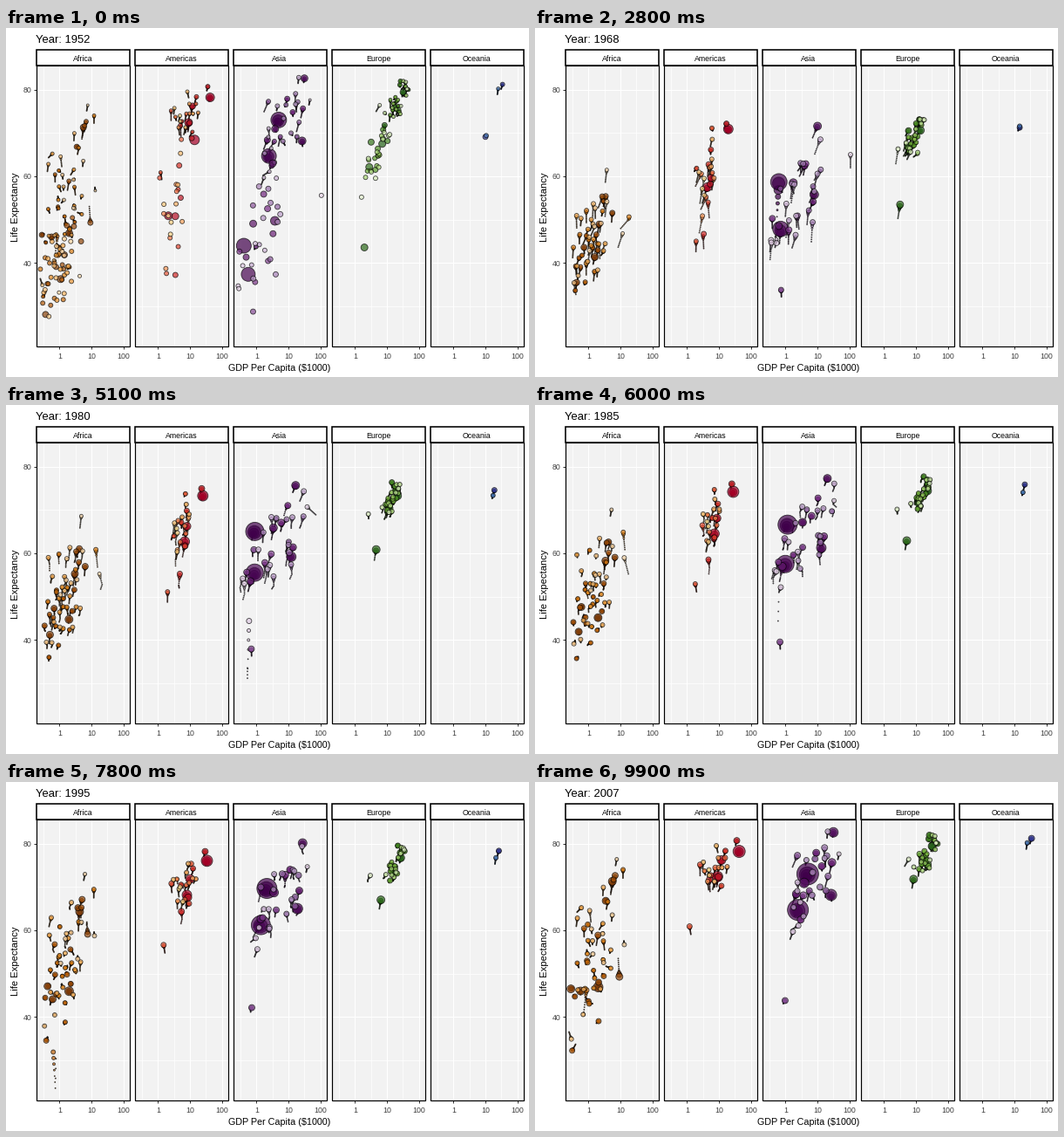
Recreate the animation shown at these times as a matplotlib script. Size 600 px wide and 400 px high, loop 10000 ms.

```python
import numpy as np
import matplotlib.pyplot as plt
from matplotlib.animation import FuncAnimation
from matplotlib.colors import LinearSegmentedColormap
from matplotlib.patches import Rectangle

W, H, FRAMES, WAKE = 600, 400, 100, 10
PX = 0.72  # points per pixel at 100 dpi
LEFT, PITCH, PANEL_W = 34.5, 113, 107
STRIP, TOP, BOTTOM = 24.5, 43, 365
YEARS = np.linspace(1952, 2007, FRAMES)
CENSUS = np.arange(1952, 2008, 5)
ERAS = (1952, 1980, 2007)

plt.rcParams["font.family"] = ["Liberation Sans", "DejaVu Sans"]


def x_pos(log_gdp, panel):
    return LEFT + PITCH * panel + 26.9 + 36.6 * log_gdp


def y_pos(life):
    return 269.4 - 4.97 * (life - 40)


def radius(pop):
    return 1.067 * (2 + 10 * np.sqrt(pop / 1319))


def lead_track(points):
    """Wealth and life through (year, gdp, life) points."""
    year, gdp, life = np.array(points).T
    return (np.interp(YEARS, year, np.log10(gdp)),
            np.interp(YEARS, year, life))


def crowd_tracks(rng, n, wealth, life, link):
    """Random tracks that follow a (mean, spread) pair in each era."""
    def deal():
        return rng.permutation(np.linspace(-1.7, 1.7, n))

    rich = deal()
    fit = link * rich + np.sqrt(1 - link ** 2) * deal()

    def walk(base, eras, jitter):
        keys = [m + s * (0.92 * base + 0.39 * deal()) for m, s in eras]
        noise = rng.normal(0, jitter, (n, len(CENSUS)))
        return [np.interp(YEARS, CENSUS, np.interp(CENSUS, ERAS, k) + e)
                for k, e in zip(np.transpose(keys), noise)]

    return list(zip(walk(rich, wealth, 0.035), walk(fit, life, 0.4)))


xs, ys, rs, fills = [], [], [], []


def add(panel, ramp, share, leads, n=0, top=0, **trend):
    """Leads have fixed paths; n more countries are drawn at random."""
    tracks = [lead_track(points) for _, points in leads]
    pop = [p for p, _ in leads]
    if n:
        tracks += crowd_tracks(np.random.default_rng(panel + 7), n, **trend)
        pop += list(top * np.arange(1, n + 1) ** -0.85)
    order = np.argsort(pop)[::-1]
    tracks = np.array(tracks)[order]
    growth = share ** ((2007 - YEARS) / 55)
    xs.append(x_pos(tracks[:, 0].T, panel))
    ys.append(y_pos(tracks[:, 1].T))
    rs.append(radius(np.outer(growth, np.array(pop)[order])))
    cmap = LinearSegmentedColormap.from_list("ramp", ramp)
    fills.append(cmap(np.linspace(0, 1, len(pop))))


add(0, ["#7F3B08", "#B35806", "#E08214", "#FDB863", "#FEE0B6"], .27, [
    (135, [(1952, 1.08, 36.3), (1977, 1.98, 44.5), (2007, 2.01, 46.9)]),
    (80, [(1952, 1.42, 41.9), (1977, 2.79, 53.3), (2007, 5.58, 71.3)]),
    (65, [(1952, .78, 39.1), (1982, .67, 47.8), (2007, .28, 46.5)]),
    (44, [(1952, 4.73, 45), (1992, 7.2, 61.9), (2007, 9.27, 49.3)]),
    (8.9, [(1952, .49, 40), (1987, .85, 44), (1992, .74, 23.6),
           (1997, .59, 36.1), (2007, .86, 46.2)]),
    (6, [(1952, 2.39, 42.7), (1967, 18.8, 50.2), (1987, 11.8, 66.2),
         (2007, 12.1, 74)]),
    (1.5, [(1952, 4.29, 37), (1977, 21.7, 52.8), (1987, 11.9, 60.2),
           (2007, 13.2, 56.7)]),
    (.8, [(1952, 2.72, 52.7), (1980, 4.8, 68.5), (2007, 7.67, 76.4)]),
], n=44, top=75, link=.45,
    wealth=[(-.05, .27), (.13, .31), (.15, .36)],
    life=[(38.7, 5), (50, 6), (54, 8.5)])

add(1, ["#A50026", "#D73027", "#F46D43", "#FDAE61", "#FEE090"], .42, [
    (301, [(1952, 14, 68.4), (1967, 19.5, 70.8), (2007, 43, 78.2)]),
    (190, [(1952, 2.11, 50.9), (1977, 6.66, 61.5), (2007, 9.07, 72.4)]),
    (109, [(1952, 3.48, 50.8), (1977, 7.67, 65), (2007, 12, 76.2)]),
    (33, [(1952, 11.4, 68.8), (1977, 22.1, 74.2), (2007, 36.3, 80.7)]),
    (8.5, [(1952, 1.84, 37.6), (1980, 2, 51), (2007, 1.2, 60.9)]),
], n=20, top=44, link=.6,
    wealth=[(.49, .2), (.74, .18), (.88, .23)],
    life=[(53, 8.5), (65.5, 5), (74, 3)])

add(2, ["#40004B", "#762A83", "#9970AB", "#C2A5CF", "#E7D4E8"], .4, [
    (1319, [(1952, .4, 44), (1957, .58, 50.5), (1962, .49, 44.5),
            (1967, .61, 58.4), (1977, .74, 64), (1992, 1.66, 68.7),
            (2007, 4.96, 73)]),
    (1110, [(1952, .55, 37.4), (1977, .81, 54.2), (1992, 1.16, 60.2),
            (2007, 2.45, 64.7)]),
    (127, [(1952, 3.22, 63), (1967, 9.85, 71.4), (1992, 26.8, 79.4),
           (2007, 31.7, 82.6)]),
    (32, [(1952, .78, 28.8), (1992, .65, 41.7), (2007, .97, 43.8)]),
    (14, [(1952, .37, 39.4), (1967, .52, 45.4), (1977, .52, 31.2),
          (1982, .62, 51), (2007, 1.71, 59.7)]),
    (2.5, [(1952, 108, 55.6), (1972, 109, 67.7), (1982, 31.4, 71.3),
           (2007, 47.3, 77.6)]),
], n=27, top=224, link=.75,
    wealth=[(.17, .36), (.58, .5), (.83, .48)],
    life=[(46.5, 8), (62, 6.5), (71.5, 5.5)])

add(3, ["#276419", "#4D9221", "#7FBC41", "#B8E186", "#E6F5D0"], .71, [
    (82, [(1952, 7.14, 67.5), (1977, 20.5, 72.5), (2007, 32.2, 79.4)]),
    (71, [(1952, 1.97, 43.6), (1977, 4.27, 59.5), (2007, 8.46, 71.8)]),
    (3.6, [(1952, 1.6, 55.2), (1967, 2.76, 66.2), (1992, 2.5, 71.6),
           (2007, 5.94, 76.4)]),
], n=27, top=61, link=.85,
    wealth=[(.71, .2), (1.17, .14), (1.37, .18)],
    life=[(65.2, 4), (72.8, 1.8), (77.7, 2.6)])

add(4, ["#313695", "#4575B4"], .45, [
    (20, [(1952, 10, 69.1), (1967, 14.5, 71.1), (1987, 21.9, 76.3),
          (2007, 34.4, 81.2)]),
    (4, [(1952, 10.6, 69.4), (1967, 14.5, 71.5), (1987, 19, 74.3),
         (2007, 25.2, 80.2)]),
])

X, Y, R = (np.hstack(group) for group in (xs, ys, rs))
FILL = np.vstack(fills)
FILL[:, 3] = 0.7

fig = plt.figure(figsize=(W / 100, H / 100), dpi=100, facecolor="white")
ax = fig.add_axes([0, 0, 1, 1])
ax.set(xlim=(0, W), ylim=(H, 0))
ax.axis("off")


def label(x, y, s, size, color="black", **kw):
    return ax.text(x, y, s, fontsize=size * PX, color=color, **kw)


def line(x, y, color, width):
    ax.plot(x, y, color=color, lw=width * PX, zorder=1,
            solid_capstyle="butt")


def box(x, y0, y1, face, width, z):
    ax.add_patch(Rectangle((x, y0), PANEL_W, y1 - y0, fc=face, ec="black",
                           lw=width * PX, zorder=z))


for k, name in enumerate(["Africa", "Americas", "Asia", "Europe", "Oceania"]):
    x0 = LEFT + PITCH * k
    x1 = x0 + PANEL_W
    box(x0, TOP, BOTTOM, "#F2F2F2", 0, 0)
    for age in range(30, 90, 10):
        line([x0, x1], [y_pos(age)] * 2, "white", 0.7 if age % 20 else 1.1)
    for power in np.arange(-.5, 2.5, .5):
        gx = x_pos(power, k)
        line([gx, gx], [TOP, BOTTOM], "white", 0.7 if power % 1 else 1.1)
        if power % 1 == 0:
            line([gx, gx], [BOTTOM, BOTTOM + 2.5], "#333333", 1)
            label(gx, 379, f"{10 ** power:g}", 8.8, "#404040", ha="center")
    box(x0, TOP, BOTTOM, "none", 1.2, 4)
    box(x0, STRIP, TOP, "white", 1.6, 4)
    label((x0 + x1) / 2, 37.5, name, 8.8, ha="center", zorder=5)

for age in (40, 60, 80):
    line([LEFT - 3, LEFT], [y_pos(age)] * 2, "#333333", 1)
    label(29.5, y_pos(age) + 3.3, age, 8.8, "#404040", ha="right")

label(313.5, 393, r"GDP Per Capita (\$1000)", 10.7, ha="center")
label(11.5, 205, "Life Expectancy", 11.2, rotation=90, ha="center",
      va="center")
title = label(LEFT, 17, "", 13)

blank = np.zeros(WAKE * len(FILL))
dots = ax.scatter(blank, blank, c=np.tile(FILL, (WAKE, 1)),
                  edgecolors=(0, 0, 0, 0.7), linewidths=0.85 * PX, zorder=3)
AGE = np.arange(WAKE - 1, -1, -1)
SHRINK = (1 - AGE / WAKE)[:, None] ** 3


def update(i):
    past = (i - AGE) % FRAMES
    dots.set_offsets(np.column_stack([X[past].ravel(), Y[past].ravel()]))
    # whole-pixel diameters, with the outline kept inside
    size = np.maximum(np.floor(2 * R[past] * SHRINK + 1.2), 2) - 1
    dots.set_sizes((PX * size.ravel()) ** 2)
    title.set_text(f"Year: {YEARS[i]:.0f}")
    return dots, title


anim = FuncAnimation(fig, update, frames=FRAMES, interval=100, repeat=True,
                     repeat_delay=0, blit=False)
plt.show()
```
